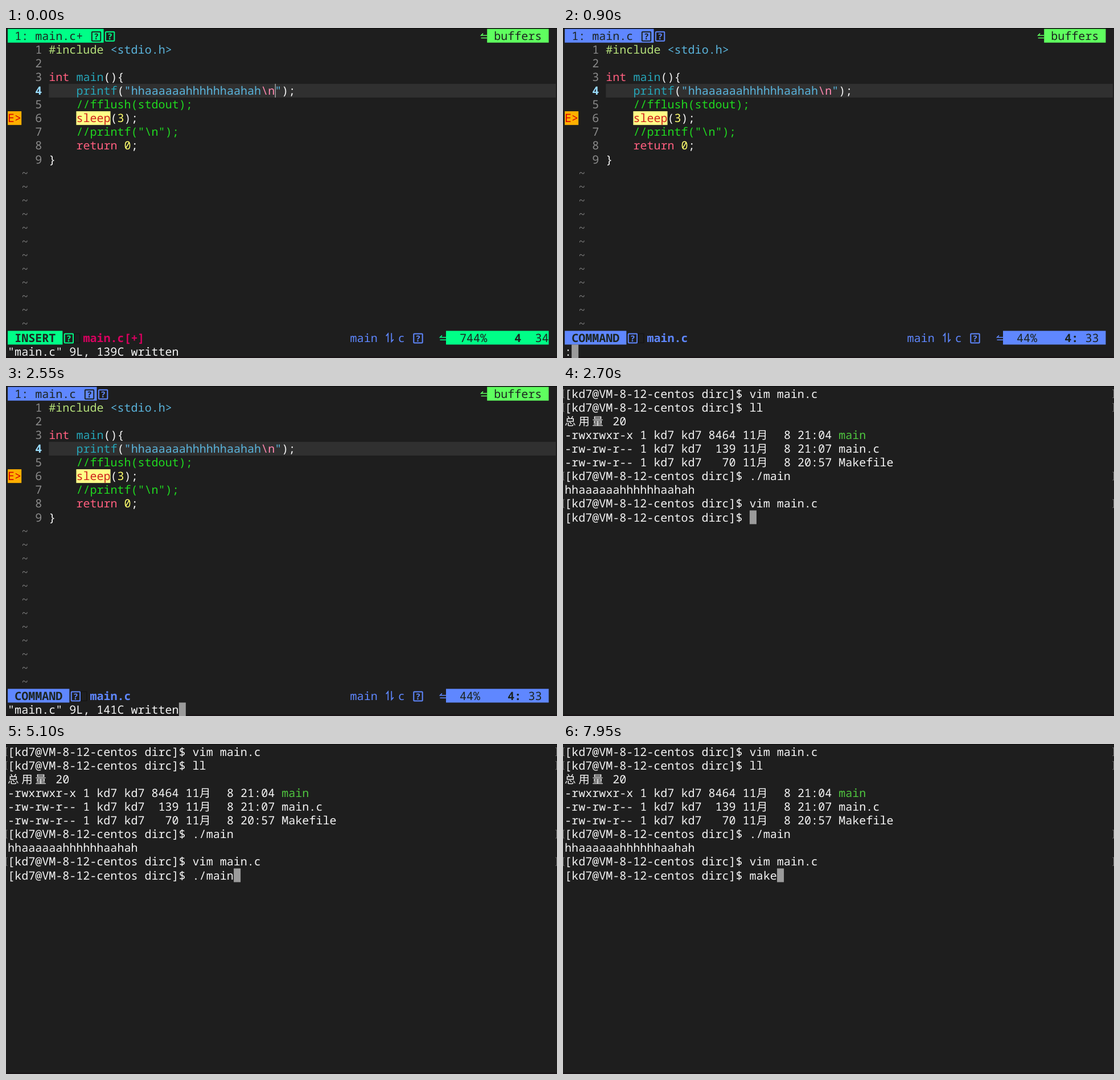
An HTML page that plays this animation: 968 by 579 pixels, repeating every 8000 ms.

```html
<!DOCTYPE html>
<html lang="en">
<head>
<meta charset="utf-8">
<title>Terminal session</title>
<style>
html, body { margin: 0; width: 100%; height: 100%; overflow: hidden; background: #1e1e1e; }
svg { display: block; }
text { font: 500 20.05px "Noto Sans Mono", "DejaVu Sans Mono", monospace; white-space: pre; text-rendering: geometricPrecision; }
.bold { font-weight: 700; }
.cjk { font: 400 19.5px "Noto Sans CJK SC", "Noto Sans CJK", sans-serif; }
</style>
</head>
<body>
<svg id="stage" width="968" height="579" viewBox="0 0 968 579"></svg>
<script>
const LOOP = 8000, CW = 12.03, RH = 24.08;
const BG = '#1e1e1e', INK = '#1c2420', WHITE = '#f4f4f4', GREY = '#8a8a8a';
const BLUE = '#5f87ff', GREEN = '#00ff87', LIME = '#5fff5f', PINK = '#ff5f7f';
const TEAL = '#26a5b8', SKY = '#5ab4dc', YELLOW = '#ffff6e', COMMENT = '#20d820', CURSOR = '#9b9b9b';

const x = col => 3.1 + col * CW;
const y = row => 1.6 + row * RH;
const esc = s => s.replace(/&/g, '&amp;').replace(/</g, '&lt;').replace(/>/g, '&gt;');

const rect = (left, top, w, h, fill) =>
  `<rect x="${left}" y="${top}" width="${w}" height="${h}" fill="${fill}"/>`;
const cells = (col, row, n, fill) => rect(x(col), y(row), n * CW, RH, fill);
const put = (col, row, s, fill = WHITE, cls = '') =>
  `<text x="${x(col)}" y="${y(row) + 19.2}" fill="${fill}" class="${cls}">${esc(s)}</text>`;

// Consecutive coloured pieces on one row
function line(col, row, ...parts) {
  let out = '';
  for (const [s, fill] of parts) {
    out += put(col, row, s, fill);
    col += s.length;
  }
  return out;
}

// Placeholder box for a glyph the terminal font lacks
function missing(col, row, color) {
  const left = x(col) + 3.4, top = y(row) + 5.2;
  return `<rect x="${left}" y="${top}" width="15.4" height="16" rx="1" fill="none" stroke="${color}" stroke-width="2"/>` +
    `<text x="${left + 7.7}" y="${top + 13.2}" text-anchor="middle" fill="${color}" class="bold" style="font-size:14.5px">?</text>`;
}

function arrows(col, row, color) {
  return `<path transform="translate(${x(col)} ${y(row)})" d="M5 8L1.5 11.5H12M1.5 16H12" fill="none" stroke="${color}" stroke-width="1.5"/>`;
}

const frame = rect(0, 0, 968, 579, BG) + rect(0, 0, 968, 1, '#0a0a0a') + rect(0, 576.5, 968, 2.5, '#191517');

function code() {
  let out = rect(x(6), y(4), 966 - x(6), RH, '#303030');
  for (let n = 1; n <= 9; n++)
    out += put(4, n, String(n), n === 4 ? '#9adcff' : GREY, n === 4 ? 'bold' : '');
  for (let r = 10; r <= 21; r++) out += put(2, r, '~', '#767676');
  return out +
    cells(0, 6, 2, '#ffaf00') + put(0, 6, 'E>', '#d70000') +
    cells(10, 6, 5, '#ffff87') +
    line(6, 1, ['#include ', '#b5e07a'], ['<stdio.h>', SKY]) +
    line(6, 3, ['int ', PINK], ['main', TEAL], ['(){', WHITE]) +
    line(10, 4, ['printf', TEAL], ['(', WHITE], ['"hhaaaaaahhhhhhaahah', SKY], ['\\n', '#ff87af'], ['"', SKY], [');', WHITE]) +
    put(10, 5, '//fflush(stdout);', COMMENT) +
    line(10, 6, ['sleep', '#d0201c'], ['(', WHITE], ['3', YELLOW], [');', WHITE]) +
    put(10, 7, '//printf("\\n");', COMMENT) +
    line(10, 8, ['return ', PINK], ['0', YELLOW], [';', WHITE]) +
    put(6, 9, '}');
}

function bars({ mode, color, dirty, pos }) {
  const tab = dirty ? 'main.c+' : 'main.c';
  const end = 5 + tab.length, tag = mode.length + 2;
  const [percent, lineNo, lineCol, column, colCol] = pos;
  return cells(0, 0, end + 2, color) + put(1, 0, '1: ' + tab, INK) +
    missing(end, 0, INK) + missing(end + 2, 0, color) +
    arrows(69, 0, LIME) + cells(70, 0, 9, LIME) + put(71, 0, 'buffers', INK) +
    cells(0, 22, tag, color) + put(1, 22, mode, INK, 'bold') +
    missing(tag, 22, color) +
    `<rect x="${x(tag) + 20.5}" y="${y(22) + 5}" width="10" height="16" fill="none" stroke="#151515" stroke-width="1.5"/>` +
    put(tag + 3, 22, dirty ? 'main.c[+]' : 'main.c', dirty ? '#d7005f' : color, 'bold') +
    put(50, 22, 'main', BLUE) +
    `<path transform="translate(${x(55) + 3} ${y(22)})" d="M3.5 20V5L0 9M9.5 4V19L13 15" fill="none" stroke="${BLUE}" stroke-width="1.7"/>` +
    put(57, 22, 'c', BLUE) + missing(59, 22, BLUE) +
    arrows(63, 22, color) + cells(64, 22, 15, color) +
    put(66, 22, percent, INK) + put(lineCol, 22, lineNo, INK, 'bold') + put(colCol, 22, column, INK);
}

const written = n => `"main.c" 9L, ${n}C written`;

function vim(state) {
  const { mode, cmd } = state;
  let out = frame + code() + bars(state);
  if (mode === 'INSERT') out += rect(x(39) + 0.3, y(4), 1.3, RH, '#b0b0b0');
  if (mode === 'NORMAL') out += `<g opacity="0.8">${cells(38, 4, 1, CURSOR)}</g>`;
  if (mode === 'COMMAND') out += cells(cmd.length, 23, 1, CURSOR);
  return out + put(0, 23, cmd);
}

const PROMPT = '[kd7@VM-8-12-centos dirc]$ ';

function marks(row) {
  const top = y(row) + 5, d = `v14`;
  return `<path d="M2.5 ${top}H0.5${d}H2.5M965.5 ${top}H967.5${d}H965.5" fill="none" stroke="#777" stroke-width="1"/>`;
}

function file(row, mode, size, time, name, color) {
  return put(0, row, `${mode} 1 kd7 kd7 ${size.padStart(4)} 11`) + put(28, row, '月', WHITE, 'cjk') +
    put(32, row, `8 ${time}`) + put(40, row, name, color);
}

function shell(input) {
  let out = frame;
  for (const [row, cmd] of [[0, 'vim main.c'], [1, 'll'], [6, './main'], [8, 'vim main.c']])
    out += marks(row) + put(0, row, PROMPT + cmd);
  [...'总用量'].forEach((c, i) => out += put(i * 2, 2, c, WHITE, 'cjk'));
  return out + put(7, 2, '20') +
    file(3, '-rwxrwxr-x', '8464', '21:04', 'main', '#4fc63f') +
    file(4, '-rw-rw-r--', '139', '21:07', 'main.c') +
    file(5, '-rw-rw-r--', '70', '20:57', 'Makefile') +
    put(0, 7, 'hhaaaaaahhhhhhaahah') +
    put(0, 9, PROMPT + input) + cells(PROMPT.length + input.length, 9, 1, CURSOR);
}

const SETTLED = ['44%', '4:', 73, '33', 76];
const insert = { mode: 'INSERT', color: GREEN, dirty: true, pos: ['744%', '4', 74, '34', 77], cmd: written(139) };
const normal = { mode: 'NORMAL', color: LIME, dirty: true, pos: SETTLED, cmd: written(139) };
const command = cmd => ({ mode: 'COMMAND', color: BLUE, dirty: false, pos: SETTLED, cmd });

const scenes = [
  [0, vim(insert)],
  [450, vim(normal)],
  [750, vim(command(':'))],
  [1350, vim(command(':w'))],
  [1800, vim(command(':wq'))],
  [2400, vim(command(written(141)))],
  [2700, shell('')],
  [3750, shell('vim main.c')],
  [5100, shell('./main')],
  [5700, shell('ll')],
  [6150, shell('vim main.c')],
  [6750, shell('clear')],
  [7500, shell('./main')],
  [7950, shell('make')]
];

const stage = document.getElementById('stage');
const start = performance.now();
let shown = null;

function draw(now) {
  const t = Math.max(0, now - start) % LOOP;
  const scene = scenes.findLast(s => s[0] <= t);
  if (scene !== shown) {
    stage.innerHTML = scene[1];
    shown = scene;
  }
  requestAnimationFrame(draw);
}
draw(start);
</script>
</body>
</html>
```
